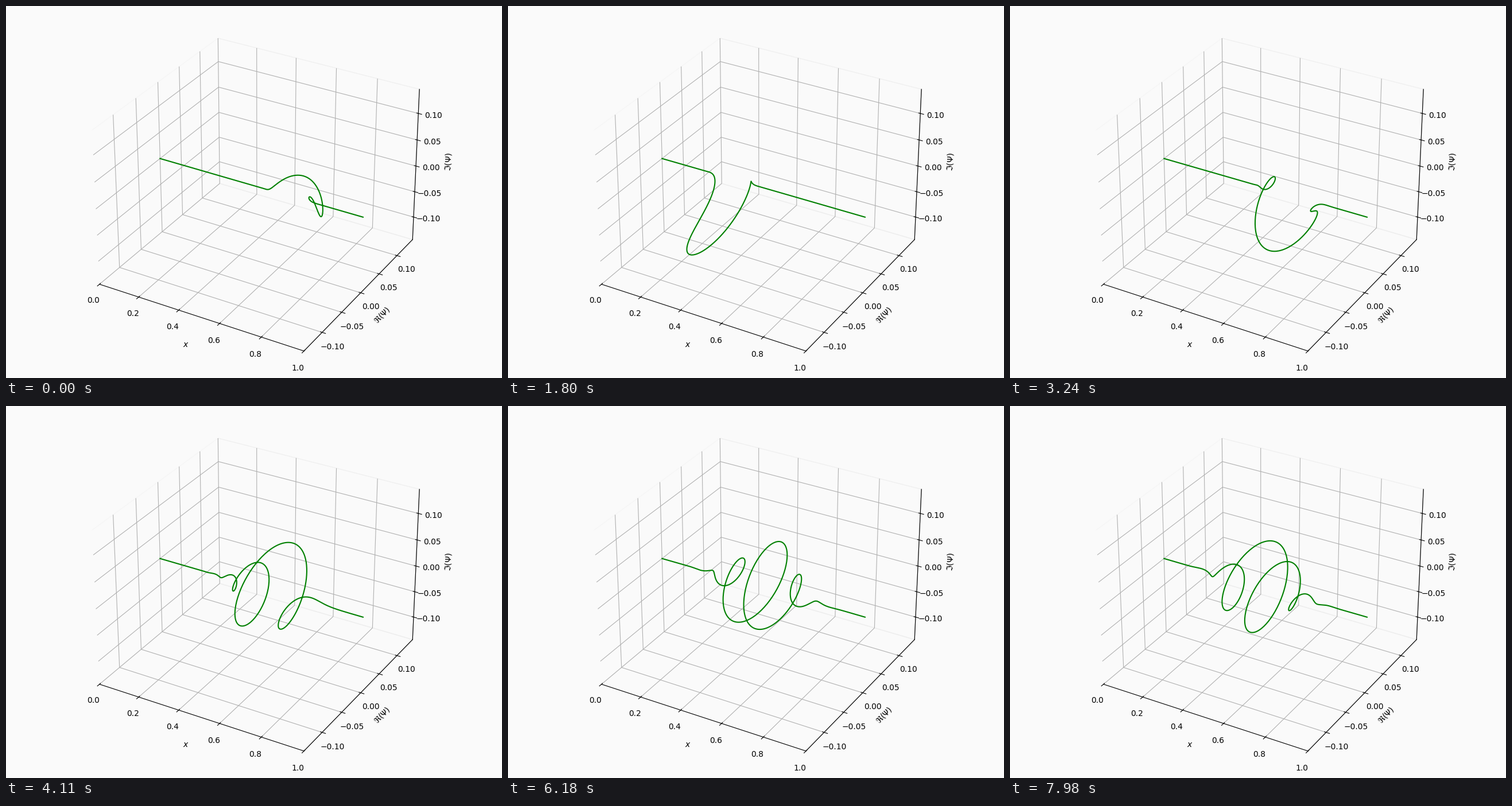
A matplotlib script that plays this animation: 864x648 px, repeating every 8000 ms.

```python
import numpy as np
import matplotlib.pyplot as plt
from matplotlib.animation import FuncAnimation

W, H, DPI = 864, 648, 100
FRAMES, LOOP = 267, 8000
BG = "#fafafa"

# Squeezed Gaussian packet swinging in a harmonic well
N = 1000
MID, SWING = 0.5, 0.15     # well centre and swing amplitude
L2 = 1e-5 ** 0.5           # oscillator length squared
S = 0.03                   # packet width at the turning point
R = L2 / S ** 2            # squeezing ratio
STEP, LEAD = 0.0528, 3     # well phase per frame, frames already elapsed
PEAK = np.sqrt(1 / (N * S * np.sqrt(np.pi)))
LIM = 0.145

x = np.linspace(0, 1, N)


def psi(tau):
    c, s = np.cos(tau), np.sin(tau)
    u = x - MID - SWING * c
    k = -SWING / L2 * s
    spread = c + 1j * R * s
    q = (R * c + 1j * s) / spread
    turn = tau + np.angle(spread * np.exp(-1j * tau))   # continuous argument
    phase = -turn / 2 - SWING ** 2 / (4 * L2) * np.sin(2 * tau)
    amp = PEAK / np.sqrt(abs(spread))
    return amp * np.exp(-q * u ** 2 / (2 * L2) + 1j * (k * u + phase))


fig = plt.figure(figsize=(W / DPI, H / DPI), dpi=DPI, facecolor=BG)
side = 634
ax = fig.add_axes([(W - side) / 2 / W, (H - side) / 2 / H, side / W, side / H],
                  projection="3d", facecolor=BG)
ax.set_xlim(0, 1)
ax.set_ylim(-LIM, LIM)
ax.set_zlim(-LIM, LIM)
ax.set_xlabel("$x$")
ax.set_ylabel(r"$\Re(\Psi)$")
ax.set_zlabel(r"$\Im(\Psi)$")
for axis in (ax.xaxis, ax.yaxis, ax.zaxis):
    axis.pane.fill = False

line, = ax.plot(x, 0 * x, 0 * x, color="green", lw=1.5)


def update(n):
    wave = psi(STEP * (n + LEAD))
    line.set_data_3d(x, wave.real, wave.imag)
    return line,


anim = FuncAnimation(fig, update, frames=FRAMES, interval=LOOP / FRAMES,
                     repeat=True, repeat_delay=0, blit=False)
plt.show()
```
